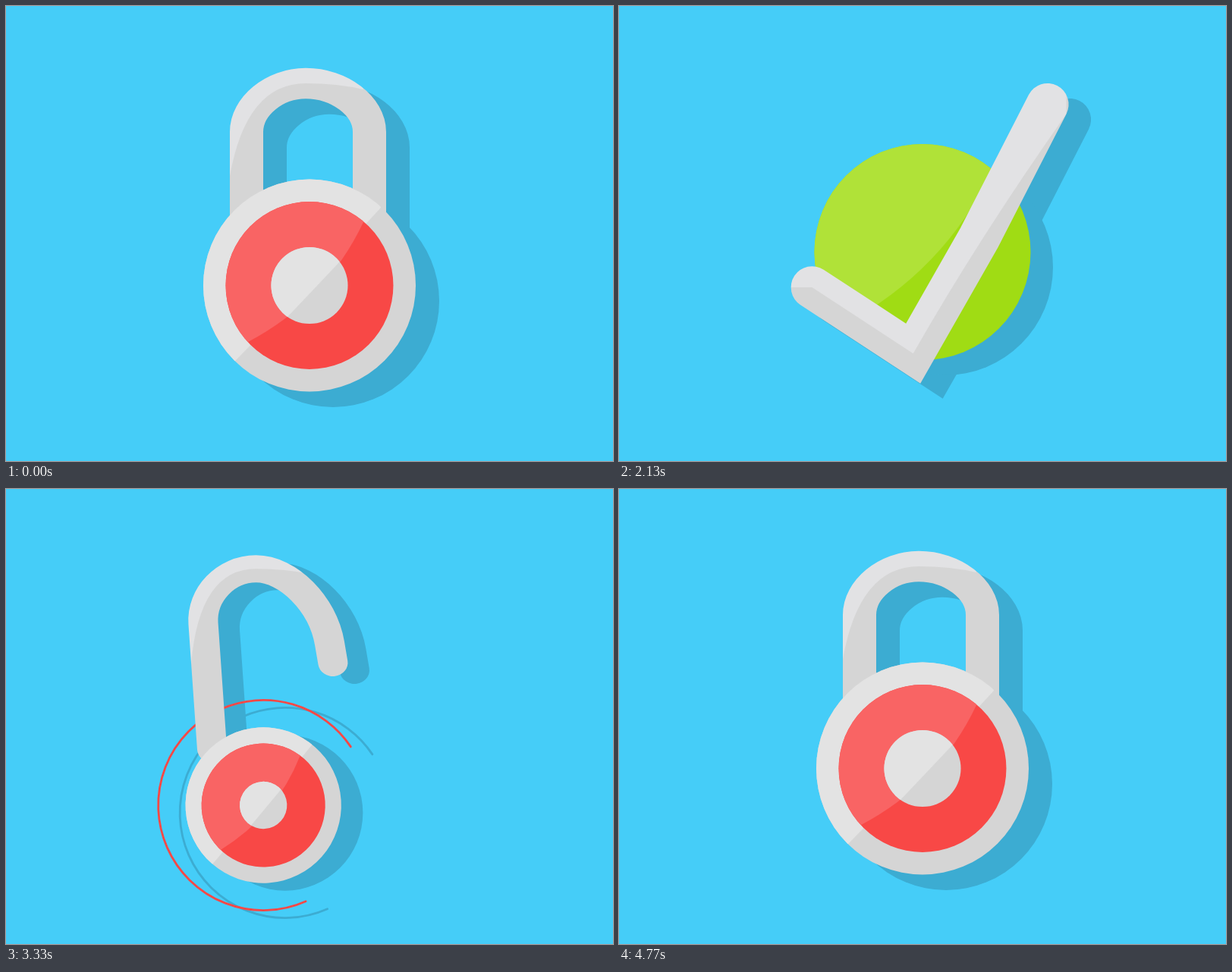
An HTML page with a canvas for the animation above (4.8 s loop, 800 px wide and 600 px high).

```html
<!DOCTYPE html>
<html lang="en">
<head>
<meta charset="utf-8">
<title>Padlock and check mark</title>
<style>
html, body { margin: 0; width: 100%; height: 100%; overflow: hidden; background: #45cdf8; }
canvas { display: block; }
</style>
</head>
<body>
<canvas id="stage" width="800" height="600"></canvas>
<script>
const LOOP = 4800, SWAP = 2685;
const SKY = '#45cdf8', SHADE = '#3cacd2';
const GREY = '#d5d5d5', PALE = '#e3e3e3', SILVER = '#e2e2e4';
const RED = [248, 72, 70], ROSE = [249, 100, 100];
const GREEN = [160, 220, 20], LIME = [176, 226, 56];

const ctx = document.getElementById('stage').getContext('2d');
const layer = document.createElement('canvas');
layer.width = 800;
layer.height = 600;
const buf = layer.getContext('2d');

// A bar runs foot, shoulder, apex, shoulder, foot.
// round: 1 is an arch, 0 a sharp corner. flat: squash of the line's height.
const bar = (points, more) => ({ points, round: 1, flat: .92, width: 44, lit: 1, ...more });
const lock = bar([[79, 121], [79, -3], [-5, -67], [-83, -3], [-83, 121]]);
const poses = [
  lock,
  bar([[60, 62], [78, 20], [12, -67], [-53, -13], [-100, 58]], { lit: 0 }),
  bar([[136, -43.5], [74, -84], [11.5, -125], [-70, 18], [-154, 182]], { round: 0, flat: 1, width: 52 }),
  bar([[103, -9], [98, -38], [-11, -148], [-89, -67], [-76, 119]]),
  bar([[42, 40], [27, -27], [-70, -106], [-149, -28], [-103, 158]]),
  lock
];

// Key states; a key names only what moves through it.
const checkAct = [
  { t: 0, x: 400, y: 368.5, r: 140, core: 1, green: 0, spin: 0, shadeX: 31, shadeY: 20.5,
    pose: 0, size: 1, turn: 0, reach: 199.5, slide: 0, drop: 0, arc: 30 },
  { t: 120, spin: 0, pose: 0, size: 1, turn: 0, reach: 228 },
  { t: 540, y: 349, r: 32, core: 0, green: 0, spin: 188, shadeX: 3, shadeY: 3.5,
    pose: 1, size: .3, turn: 180, reach: 65, arc: 44 },
  { t: 720, green: 1 },
  { t: 1110, y: 323.5, r: 131.5, spin: 360, shadeX: 29.5, shadeY: 20, pose: 2, size: 1, reach: 0, arc: 182.5 },
  { t: 1350, y: 324.5, r: 142.5, size: 1.07 },
  { t: 2130, slide: 0 },
  { t: 2370, x: 400, slide: -150 },
  { t: 2640, x: 403.5, slide: 560 },
  { t: SWAP, slide: 700 }
];
const lockAct = [
  { t: SWAP, x: 403.5, y: 324.5, r: 142.5, core: 0, green: 1, spin: 360, shadeX: 29.5, shadeY: 20,
    pose: 3, size: .89, turn: 0, reach: 180, slide: 0, drop: -480, arc: 100 },
  { t: 2960, x: 215, y: 370, r: 92, spin: 250 },
  { t: 3180, x: 250, y: 400, r: 78, core: 0, green: 0, drop: -480 },
  { t: 3330, x: 339, y: 417, r: 102.5, core: .84, spin: 356.3, shadeX: 28.5, shadeY: 10,
    pose: 3, size: .89, reach: 180, drop: 0, arc: 138.5 },
  { t: 3810, x: 400, y: 375, r: 155, core: 1, spin: 345.3, shadeX: 55.5, shadeY: 19,
    pose: 4, size: 1.1, reach: 219, arc: 171 },
  { t: 3950, r: 172, size: 1.18, reach: 232 },
  { t: 4290, y: 368.5, r: 140, spin: 360, shadeX: 152, shadeY: 25, pose: 5, size: 1, reach: 199.5 },
  { t: 4770, shadeX: 31, shadeY: 20.5 }
];
const sweeps = [
  { start: 511, end: 1123, from: 143, to: 683, color: GREEN },
  { start: 3255, end: 3813, from: 66, to: 653, color: RED }
];

const rad = deg => deg * Math.PI / 180;
const lerp = (a, b, k) => a + (b - a) * k;
const blend = (a, b, k) => a.map((v, i) => lerp(v, b[i], k));
const rgb = c => `rgb(${c.map(Math.round)})`;

// Monotone cubic: smooth through the keys, never past them.
function sample(act, name, t) {
  const keys = act.filter(k => name in k), last = keys.length - 1;
  if (t <= keys[0].t) return keys[0][name];
  if (t >= keys[last].t) return keys[last][name];
  let i = 0;
  while (t >= keys[i + 1].t) i++;
  const rate = n => (keys[n + 1][name] - keys[n][name]) / (keys[n + 1].t - keys[n].t);
  const slope = n => {
    if (n === 0 || n === last) return 0;
    const a = rate(n - 1), b = rate(n);
    return a * b <= 0 ? 0 : 2 * a * b / (a + b);
  };
  const h = keys[i + 1].t - keys[i].t, u = (t - keys[i].t) / h, v = 1 - u;
  return keys[i][name] * v * v * (1 + 2 * u) + slope(i) * h * u * v * v
    + keys[i + 1][name] * u * u * (3 - 2 * u) - slope(i + 1) * h * u * u * v;
}

function mixPose(p) {
  const i = Math.min(Math.floor(p), poses.length - 2), k = p - i;
  const a = poses[i], b = poses[i + 1], mix = {};
  for (const name of ['round', 'flat', 'width', 'lit']) mix[name] = lerp(a[name], b[name], k);
  mix.points = a.points.map((pt, n) => blend(pt, b.points[n], k));
  return mix;
}

// Where the leg's line meets the apex's height, pulled back to the shoulder on sharp bars.
function knee([fx, fy], [sx, sy], [, ay], round) {
  const x = sx + (fx - sx) * (ay - sy) / (fy - sy);
  return blend([sx, sy], [x, ay], round);
}

function disc(c, x, y, r, fill) {
  c.beginPath();
  c.arc(x, y, r, 0, 2 * Math.PI);
  c.fillStyle = fill;
  c.fill();
}

function placeBar(c, s) {
  const a = rad(s.turn);
  c.translate(s.x + s.slide + s.reach * Math.sin(a), s.y + s.drop - s.reach * Math.cos(a));
  c.rotate(a);
  c.scale(s.size, s.size);
}

function strokeBar(c, s, shape, color) {
  const [a, b, top, d, e] = shape.points.map(([x, y]) => [x, y / shape.flat]);
  const k1 = knee(a, b, top, shape.round), k2 = knee(e, d, top, shape.round), pull = .53;
  c.save();
  placeBar(c, s);
  c.scale(1, shape.flat);
  c.beginPath();
  c.moveTo(...a);
  c.lineTo(...b);
  c.bezierCurveTo(...blend(b, k1, pull), ...blend(top, k1, pull), ...top);
  c.bezierCurveTo(...blend(top, k2, pull), ...blend(d, k2, pull), ...d);
  c.lineTo(...e);
  c.lineWidth = shape.width;
  c.lineCap = 'round';
  c.strokeStyle = color;
  c.stroke();
  c.restore();
}

// The lit side is bounded by a curve from one edge, over the apex, to the other edge.
function lightBar(c, s, shape) {
  const { points: [a, b, top, d, e], round, width } = shape;
  const k1 = knee(a, b, top, round), k2 = knee(e, d, top, round);
  const leg = Math.hypot(e[0] - d[0], e[1] - d[1]);
  const dx = (e[0] - d[0]) / leg, dy = (e[1] - d[1]) / leg;
  const near = blend(a, [lerp(top[0], k1[0], .9), top[1] + 8], round);
  const base = blend(e, [d[0] + 58 * dx, d[1] + 58 * dy], round);
  const edge = [base[0] - dy * width / 2, base[1] + dx * width / 2];
  const turned = s.turn > 90, far = turned ? 600 : -600;
  const [left, right] = turned ? [near, edge] : [edge, near];
  const [bendL, bendR] = turned ? [k1, k2] : [k2, blend(top, k1, .5)];
  c.save();
  placeBar(c, s);
  c.globalCompositeOperation = 'source-atop';
  c.globalAlpha = shape.lit;
  c.beginPath();
  c.moveTo(...left);
  c.quadraticCurveTo(...bendL, ...top);
  c.quadraticCurveTo(...bendR, ...right);
  c.lineTo(right[0], far);
  c.lineTo(far, far);
  c.lineTo(far, left[1]);
  c.fillStyle = SILVER;
  c.fill();
  c.restore();
}

function drawBar(s, shape) {
  buf.clearRect(0, 0, 800, 600);
  strokeBar(buf, s, shape, GREY);
  lightBar(buf, s, shape);
  ctx.drawImage(layer, 0, 0);
}

// A disc whose upper left side is lit, split by a curve from a to b.
function litDisc(s, r, dark, light, a, b, bend) {
  if (r < .3) return;
  ctx.save();
  ctx.translate(s.x, s.y);
  ctx.rotate(rad(s.spin));
  ctx.scale(r, r);
  disc(ctx, 0, 0, 1, dark);
  ctx.clip();
  ctx.beginPath();
  ctx.moveTo(...a);
  ctx.quadraticCurveTo(...bend, ...b);
  ctx.lineTo(-2, b[1]);
  ctx.lineTo(-2, -2);
  ctx.lineTo(a[0], -2);
  ctx.fillStyle = light;
  ctx.fill();
  ctx.restore();
}

function drawBall(s) {
  const face = s.r * (1 - .211 * (1 - (1 - s.core) ** 2));
  if (s.core > 0) litDisc(s, s.r, GREY, PALE, [.671, -.732], [-.7, .711], [0, 0]);
  litDisc(s, face, rgb(blend(RED, GREEN, s.green)), rgb(blend(ROSE, LIME, s.green)),
    [.643, -.756], [-.733, .674], [.2, .18]);
  litDisc(s, s.r * .361 * s.core, GREY, PALE, [.792, -.624], [-.594, .841], [.1, .11]);
}

// An arc whose head rushes ahead and whose tail catches up.
function drawSweeps(s, t, color) {
  for (const w of sweeps) {
    const u = (t - w.start) / (w.end - w.start);
    if (u <= 0 || u >= 1) continue;
    const tail = lerp(w.from, w.to, u ** 4), head = lerp(w.from, w.to, 1 - (1 - u) ** 4);
    ctx.beginPath();
    ctx.arc(s.x, s.y, s.arc, rad(tail), rad(head));
    ctx.lineWidth = .8 + s.arc * .0145;
    ctx.lineCap = 'round';
    ctx.strokeStyle = color || rgb(w.color);
    ctx.stroke();
  }
}

function draw(t) {
  const act = t < SWAP ? checkAct : lockAct, s = {};
  for (const name in act[0]) s[name] = sample(act, name, t);
  const shape = mixPose(s.pose);

  ctx.fillStyle = SKY;
  ctx.fillRect(0, 0, 800, 600);

  ctx.save();
  ctx.translate(s.shadeX, s.shadeY);
  drawSweeps(s, t, SHADE);
  strokeBar(ctx, s, shape, SHADE);
  disc(ctx, s.x, s.y, s.r, SHADE);
  ctx.restore();

  drawSweeps(s, t);
  if (s.turn > 90) {
    drawBall(s);
    drawBar(s, shape);
  } else {
    drawBar(s, shape);
    drawBall(s);
  }
}

const start = performance.now();
function tick() {
  draw((performance.now() - start) % LOOP);
  requestAnimationFrame(tick);
}
tick();
</script>
</body>
</html>
```
